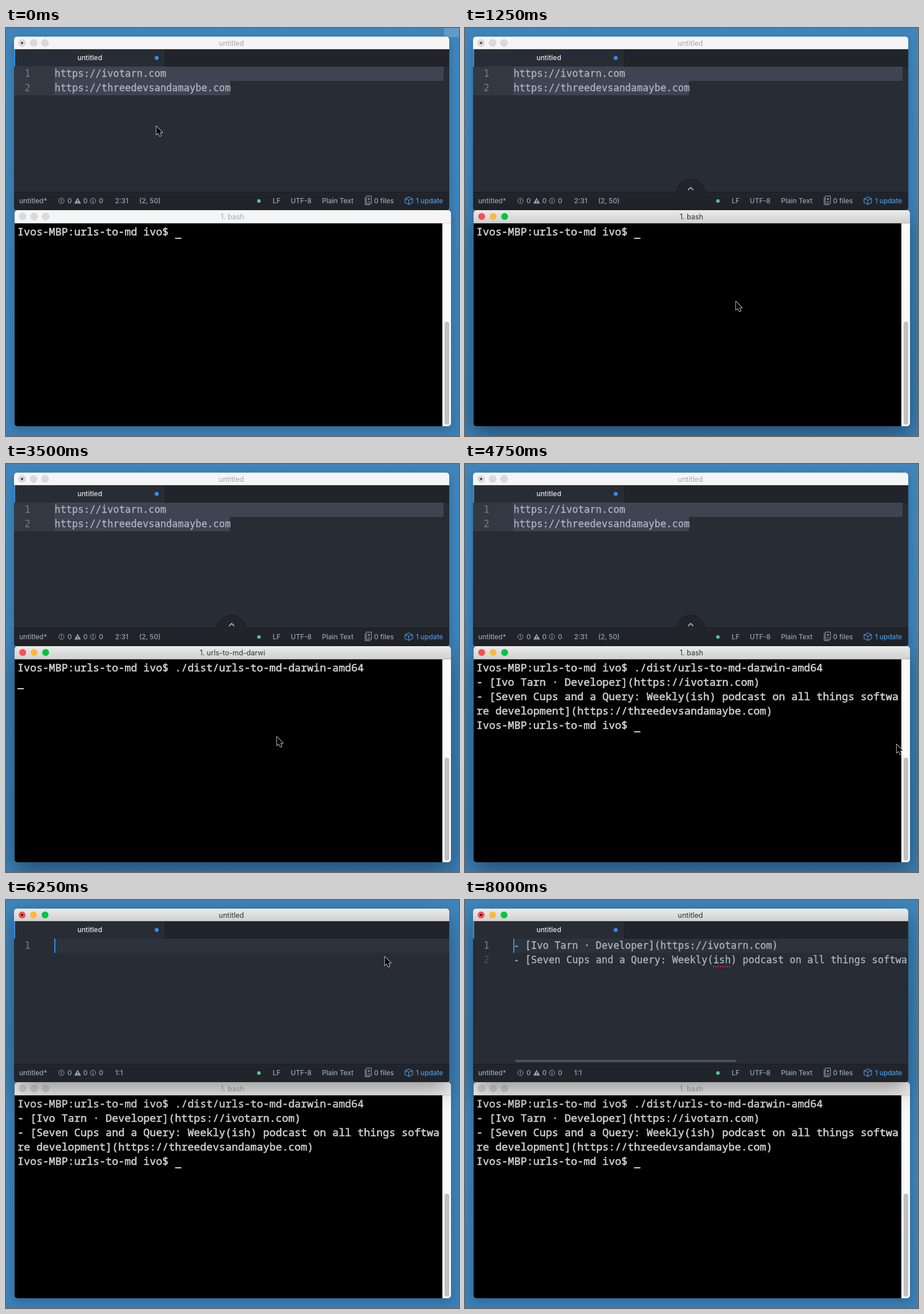
These frames come from a looping animation (789 by 710 pixels, 8.25 s). An HTML page with a canvas:

```html
<!DOCTYPE html>
<html lang="en">
<head>
<meta charset="utf-8">
<title>urls-to-md</title>
<style>
html, body { margin: 0; width: 100%; height: 100%; overflow: hidden; background: #3f86bd; }
canvas { display: block; }
</style>
</head>
<body>
<canvas id="stage" width="789" height="710"></canvas>
<script>
const ctx = document.getElementById('stage').getContext('2d');
const LOOP = 8250, STEP = 250, BLINK = 800;
const UI = 'Inter, "Open Sans", sans-serif';
const EDITOR_FONT = '17px "DejaVu Sans Mono", monospace';
const TERM_FONT = '500 18.3px "Noto Sans Mono", monospace';
const COL = 10.234, CELL = 10.98, ROW = 25, LEFT = 84, TOP = 67;
const ACCENT = '#2f8fee', GRAY = '#9da5b4', DOCK_FILL = '#21252b', LINE = '#181a1f';

const PROMPT = 'Ivos-MBP:urls-to-md ivo$ ';
const TYPED = ['', './dis', './dist/', './dist/urls-to-md-darwin-amd64'];
const URLS = ['https://ivotarn.com', 'https://threedevsandamaybe.com'];
const LINKS = [
  `- [Ivo Tarn · Developer](${URLS[0]})`,
  `- [Seven Cups and a Query: Weekly(ish) podcast on all things software development](${URLS[1]})`
];
const WRAP = 67;
const OUTPUT = [LINKS[0], LINKS[1].slice(0, WRAP), LINKS[1].slice(WRAP), PROMPT];

// When each action of the session happens, in ms.
const CUE = {
  dockIn: 750, focusTerm: 1000, type: 2500, run: 3500, print: 3750, exit: 4250,
  dockOut: 5000, focusEditor: 5250, cut: 6250, paste: 7000, home: 7750
};

// Resting points of the pointer; it eases from one to the next.
const MOUSE = [
  { t: 250, x: 261, y: 170 }, { t: 1250, x: 471, y: 475 }, { t: 1500, x: 471, y: 474 },
  { t: 3750, x: 471, y: 474 }, { t: 4750, x: 751, y: 487 }, { t: 5500, x: 714, y: 83 },
  { t: 6000, x: 659, y: 98 }
];

function glide(t) {
  const i = MOUSE.findIndex(p => p.t > t);
  if (i < 0) return MOUSE[MOUSE.length - 1];
  if (i === 0) return MOUSE[0];
  const a = MOUSE[i - 1], b = MOUSE[i];
  const u = (t - a.t) / (b.t - a.t), k = u * u * (3 - 2 * u);
  return { x: Math.round(a.x + (b.x - a.x) * k), y: Math.round(a.y + (b.y - a.y) * k) };
}

function editorState(t) {
  const blink = since => t >= since && (t - since) % BLINK < BLINK / 2;
  if (t < CUE.cut) return { lines: URLS, selected: true, row: 1, col: 30, pos: '2:31', caret: blink(CUE.focusEditor) };
  if (t < CUE.paste) return { lines: [''], row: 0, col: 0, pos: '1:1', caret: blink(CUE.cut) };
  const row = t < CUE.home ? 1 : 0;
  return { lines: LINKS, links: true, row, col: 0, pos: `${row + 1}:1`, caret: blink(row ? CUE.paste : CUE.home) };
}

function termLines(t) {
  const stage = t < CUE.type ? 0 : Math.max(1, Math.floor((t - CUE.type) / STEP));
  const lines = [PROMPT + TYPED[Math.min(stage, TYPED.length - 1)]];
  if (t < CUE.run) return lines;
  if (t < CUE.print) return [...lines, ''];
  return t < CUE.print + STEP ? [...lines, OUTPUT[0], ''] : [...lines, ...OUTPUT];
}

function rect(x, y, w, h, fill) {
  ctx.fillStyle = fill;
  ctx.fillRect(x, y, w, h);
}

function round(x, y, w, h, r, fill) {
  ctx.fillStyle = fill;
  ctx.beginPath();
  ctx.roundRect(x, y, w, h, r);
  ctx.fill();
}

function dot(x, y, r, fill, edge) {
  ctx.beginPath();
  ctx.arc(x, y, r, 0, Math.PI * 2);
  if (fill) { ctx.fillStyle = fill; ctx.fill(); }
  if (edge) { ctx.strokeStyle = edge; ctx.lineWidth = 1; ctx.stroke(); }
}

function path(points, color, width, close) {
  ctx.beginPath();
  points.forEach(([x, y]) => ctx.lineTo(x, y));
  if (close) ctx.closePath();
  ctx.strokeStyle = color;
  ctx.lineWidth = width;
  ctx.stroke();
}

// "heavy" thickens the strokes by that many pixels.
function text(str, x, y, font, color, { align = 'left', heavy = 0 } = {}) {
  ctx.font = font;
  ctx.textAlign = align;
  ctx.fillStyle = ctx.strokeStyle = color;
  ctx.fillText(str, x, y);
  if (!heavy) return;
  ctx.lineWidth = heavy;
  ctx.lineJoin = 'round';
  ctx.strokeText(str, x, y);
}

function vertical(y0, y1, top, bottom) {
  const g = ctx.createLinearGradient(0, y0, 0, y1);
  g.addColorStop(0, top);
  g.addColorStop(1, bottom);
  return g;
}

function clipped(x, y, w, h, paint) {
  ctx.save();
  ctx.beginPath();
  ctx.rect(x, y, w, h);
  ctx.clip();
  paint();
  ctx.restore();
}

function frame(x, y, w, h, active, fill) {
  ctx.save();
  ctx.shadowColor = `rgba(0,0,0,${active ? 0.4 : 0.22})`;
  ctx.shadowBlur = active ? 40 : 18;
  ctx.shadowOffsetY = active ? 14 : 5;
  round(x, y, w, h, 5, fill);
  ctx.restore();
}

function titleBar(x, y, w, h, title, active) {
  const fill = active ? vertical(y, y + h, '#ebebeb', '#d0d0d0') : '#f5f5f5';
  round(x, y, w, h, [5, 5, 0, 0], fill);
  rect(x, y + h - 1, w, 1, active ? '#b4b4b4' : '#dadada');
  ['#ff4c51', '#ffb83d', '#00c641'].forEach((color, i) =>
    dot(x + 14 + i * 20, y + 11, 6, active ? color : '#dadada', active ? null : '#d0d0d0'));
  text(title, x + w / 2 - 0.5, y + 15.7, '12.5px ' + UI, active ? '#333333' : '#a8a8a8', { align: 'center' });
}

function fileIcon(x, y) {
  ctx.strokeStyle = GRAY;
  ctx.lineWidth = 1;
  ctx.strokeRect(x + 2, y, 9, 13);
  path([[x, y + 2], [x, y + 15], [x + 9, y + 15]], GRAY, 1);
  path([[x + 4, y + 5], [x + 9, y + 5]], GRAY, 1);
  path([[x + 6.5, y + 2.5], [x + 6.5, y + 7.5]], GRAY, 1);
  path([[x + 4, y + 10], [x + 9, y + 10]], GRAY, 1);
}

function boxIcon(x, y, color) {
  const corner = i => [x + 7.5 * Math.sin(i * Math.PI / 3), y - 6.5 * Math.cos(i * Math.PI / 3)];
  path([0, 1, 2, 3, 4, 5].map(corner), color, 1.2, true);
  [1, 3, 5].forEach(i => path([[x, y - 1], corner(i)], color, 1.2));
}

function badge(x, y, flipped) {
  dot(x, y, 4.6, null, GRAY);
  rect(x - 0.6, y + (flipped ? -0.8 : -2.8), 1.2, 3.6, GRAY);
  rect(x - 0.6, y + (flipped ? -2.8 : 1.6), 1.2, 1.2, GRAY);
}

function warning(x, y) {
  ctx.fillStyle = GRAY;
  ctx.beginPath();
  ctx.moveTo(x, y - 5.2);
  ctx.lineTo(x + 5.8, y + 4.8);
  ctx.lineTo(x - 5.8, y + 4.8);
  ctx.fill();
  rect(x - 0.6, y - 1.7, 1.3, 3, DOCK_FILL);
  rect(x - 0.6, y + 2.3, 1.3, 1.3, DOCK_FILL);
}

function statusBar(t, state) {
  const label = (s, x, color = GRAY) => text(s, x, 305.2, '500 11.8px ' + UI, color);
  round(14, 286, 758, 31, [0, 0, 5, 5], DOCK_FILL);
  rect(14, 285, 758, 1, LINE);
  if (t >= CUE.dockIn && t < CUE.dockOut) {
    clipped(360, 255, 66, 32, () => dot(393, 288, 25, DOCK_FILL, LINE));
    path([[388.5, 282], [393, 277.5], [397.5, 282]], GRAY, 2);
  }

  label('untitled*', 23);
  badge(96.5, 300.7, false);
  warning(124.8, 300.7);
  badge(151.5, 300.7, true);
  for (let i = 0; i < 3; i++) label('0', 107 + i * 27.4);
  label(state.pos, 190);
  if (state.selected) label('(2, 50)', 232);

  dot(440.5, 301, 3.1, '#5ccb94');
  label('LF', 464.5);
  label('UTF-8', 496);
  label('Plain Text', 550.5);
  fileIcon(625.5, 292.5);
  label('0 files', 641);
  boxIcon(701.5, 300.5, '#4a9ae6');
  label('1 update', 714, '#4a9ae6');
}

function editorText(state) {
  const { lines, selected, links, row, col, caret } = state;
  if (selected) {
    rect(14, TOP, LEFT - 14, 2 * ROW, '#333943');
    rect(LEFT, TOP, 678, ROW, '#3e4451');
    rect(LEFT, TOP + ROW, 30 * COL - 1, ROW, '#3e4451');
  } else {
    rect(LEFT, TOP + row * ROW, 688, ROW, '#2c333c');
  }
  lines.forEach((line, i) => {
    const y = TOP + 18 + i * ROW;
    const shade = selected || i === row ? '#757c87' : '#4b5260';
    text(String(i + 1), 42.5, y, EDITOR_FONT, shade, { align: 'right' });
    text(line, LEFT + 0.4, y, EDITOR_FONT, '#abb2bf', { heavy: 0.35 });
  });
  if (links) {
    for (let x = 432; x < 462; x += 4) rect(x, 115, 2, 2, '#d8255c');
    round(87, 278, 386, 4, 2, '#4b515c');
  }
  if (caret) rect(LEFT + col * COL - (col ? 1 : 0), TOP + row * ROW, 2, ROW, ACCENT);
}

function editor(t) {
  const active = t >= CUE.focusEditor, state = editorState(t);
  frame(14, 15, 758, 302, active, '#282c34');
  titleBar(14, 15, 758, 22, 'untitled', active);
  dot(28, 26, 2, active ? '#5a0508' : '#444444');
  rect(277, 37, 495, 30, DOCK_FILL);
  rect(277, 37, 1, 30, LINE);
  rect(277, 66, 495, 1, LINE);
  rect(14, 37, 2, 30, ACCENT);
  text('untitled', 146, 55.7, '500 12px ' + UI, '#e4e6ea', { align: 'center' });
  dot(262.5, 52, 3.5, ACCENT);
  clipped(14, TOP, 758, 218, () => editorText(state));
  statusBar(t, state);
}

function terminal(t) {
  const active = t >= CUE.focusTerm && t < CUE.focusEditor;
  const running = t >= CUE.run && t < CUE.exit;
  frame(15, 317, 760, 376, active, '#000');
  titleBar(15, 317, 760, 23, running ? '1. urls-to-md-darwi' : '1. bash', active);
  round(760, 340, 15, 353, [0, 0, 5, 0], '#fafafa');
  round(764, 511, 8, 179, 4, '#c1c1c1');

  const lines = termLines(t), last = lines.length - 1;
  lines.forEach((line, i) => text(line, 20, 361 + i * ROW, TERM_FONT, '#cfcfcf', { heavy: 0.6 }));
  rect(20 + lines[last].length * CELL, 365 + last * ROW, 11, 2, '#cfcfcf');
}

function pointer({ x, y }) {
  const shape = [[0, 0], [0, 15], [3.4, 12], [6, 17.6], [8.6, 16.5], [6.2, 11], [10.8, 11]];
  ctx.save();
  ctx.translate(x + 0.7, y + 0.7);
  ctx.lineJoin = 'round';
  path(shape, '#f2f2f2', 1.5, true);
  ctx.fillStyle = '#000';
  ctx.fill();
  ctx.restore();
}

function draw(t) {
  rect(0, 0, 789, 710, vertical(0, 710, '#3f86bd', '#3b80b7'));
  if (t < STEP) rect(763, 0, 26, 16, 'rgba(255,255,255,.18)');
  const stack = t >= CUE.focusEditor ? [terminal, editor] : [editor, terminal];
  stack.forEach(paint => paint(t));
  if (t < CUE.home) pointer(glide(t));
}

const start = performance.now();
function tick() {
  const t = (performance.now() - start) % LOOP;
  draw(Math.floor(t / STEP) * STEP);
  requestAnimationFrame(tick);
}
tick();
</script>
</body>
</html>
```
